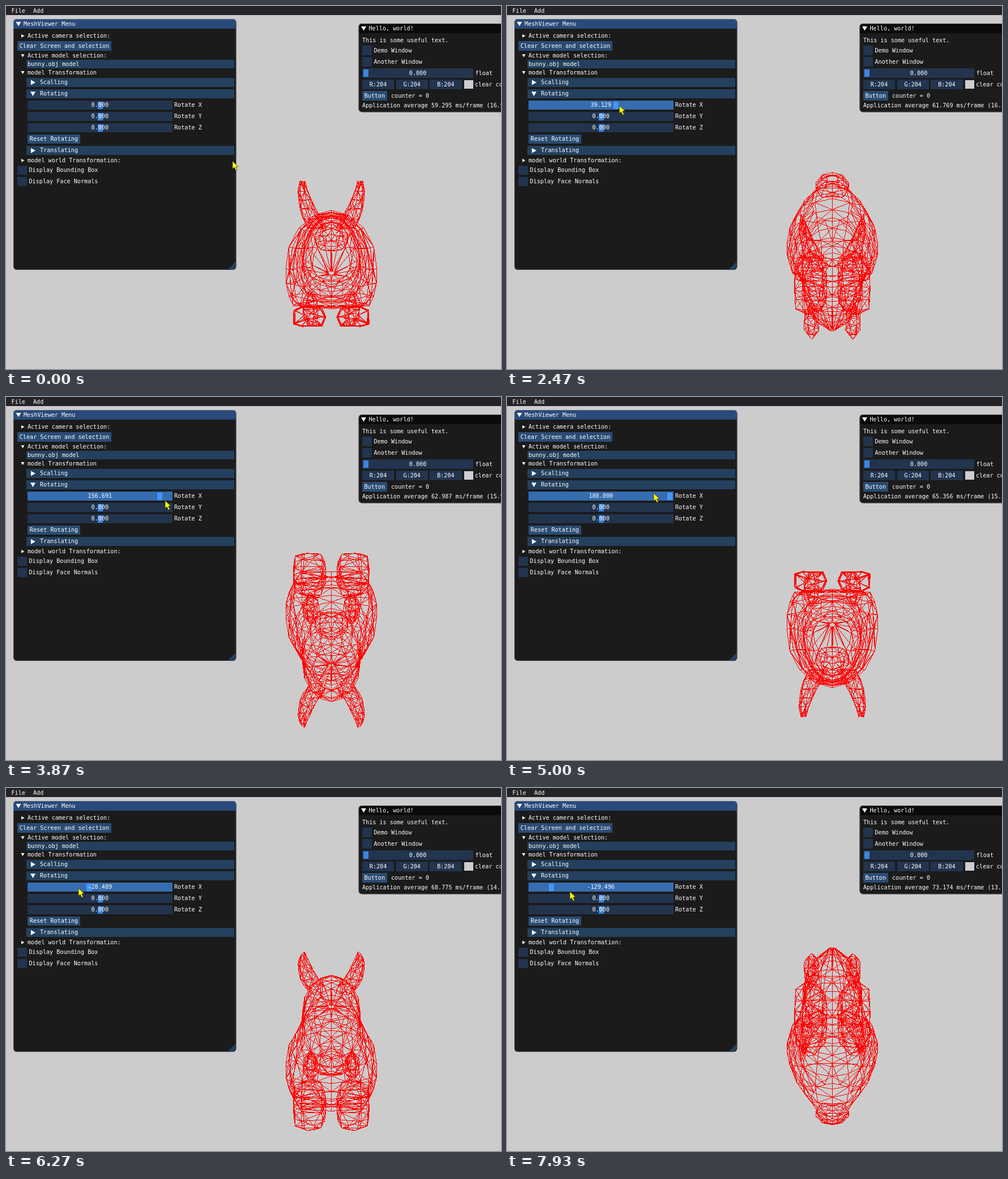
Animation, 874 px wide and 641 px high, one loop 8000 ms. Source, as an HTML page with a canvas:

```html
<!DOCTYPE html>
<html>
<head>
<meta charset="utf-8">
<style>
html, body { margin: 0; width: 100%; height: 100%; overflow: hidden; background: #ccc; }
canvas { display: block; }
</style>
</head>
<body>
<canvas id="stage" width="874" height="641"></canvas>
<script>
const c = document.getElementById('stage').getContext('2d');
const STEP = 200 / 3, STEPS = 120;
const FRAME = '#22344e', BUTTON = '#2a4c74', HEADER = '#24405f',
      GRAB = '#3d85e0', ACTIVE = '#356db0', ACTIVE_GRAB = '#4296fa';
const { PI, sin, cos, sqrt, abs, max, min, round } = Math;

// ---- timeline, in steps of 1/15 s ----
const HOVER = 14, PRESS = 22, ZERO_X = 166, PER_DEGREE = 0.675;
// step, x, y
const mouse = [[0, 400, 274], [6, 240, 66], [10, 101, 121], [14, 166, 172], [22, 169, 176], [27, 172.4965, 177],
  [28, 172, 177], [44, 218.8238, 175], [45, 220, 175], [52, 238, 178], [57, 274.7664, 182], [58, 281, 183],
  [66, 326, 190], [74, 291, 170], [75, 259, 170], [77, 242, 172], [93, 149.7699, 177], [94, 128, 177],
  [104, 23, 183], [108, 9, 187], [112, 12, 187], [118, 81.5902, 184], [119, 111, 183]];
const frameTime = [[0, 59.295], [28, 61.323], [45, 62.165], [58, 62.987], [75, 65.356], [94, 68.775], [119, 73.174]];

// Linear interpolation of column k; keys rise in column 0.
function at(keys, n, k) {
  let i = 1;
  while (i < keys.length - 1 && keys[i][0] < n) i++;
  const a = keys[i - 1], b = keys[i];
  return a[k] + (b[k] - a[k]) * (n - a[0]) / (b[0] - a[0]);
}

// The slider follows the pointer one step late, from the point where it was grabbed.
function angleAt(n) {
  if (n <= PRESS) return 0;
  const value = (at(mouse, n - 1, 1) - ZERO_X - 3) / PER_DEGREE;
  return max(-180, min(180, value));
}

// ---- mesh: one half, mirrored in x when drawn ----
let seed = 7;
const jitter = size => ((seed = seed * 16807 % 2147483647) / 2147483647 - 0.5) * size;
const list = (n, f) => Array.from({ length: n }, (_, i) => f(i));
const edges = [];

function skin(rings, closed) {
  const pts = rings.map(ring => ring.map(([x, y, z]) => [x && x + jitter(2), y + jitter(3), z + jitter(5)]));
  pts.forEach((ring, j) => ring.forEach((p, i) => {
    const k = closed ? (i + 1) % ring.length : i + 1;
    const next = pts[j + 1];
    if (next) edges.push([p, next[i]]);
    if (k >= ring.length) return;
    edges.push([p, ring[k]]);
    if (next) edges.push((i + j) % 2 ? [p, next[k]] : [ring[k], next[i]]);
  }));
}

// profile keys: z, top, bottom, half width
function hull(profile, count, n) {
  const z0 = profile[0][0], z1 = profile[profile.length - 1][0];
  skin(list(count, j => {
    const z = z0 + (z1 - z0) * j / (count - 1);
    const [top, bottom, w] = [1, 2, 3].map(k => at(profile, z, k));
    const mid = bottom + 0.4 * (top - bottom);
    return list(n + 1, i => {
      const t = PI * (i / n - 0.5), s = sin(t);
      const bulge = s < 0 && z > 20 && z < 140 ? 0.2 : 1;
      return [i % n ? -w * cos(t) ** bulge : 0, mid + s * (s > 0 ? top - mid : mid - bottom), z];
    });
  }), false);
}

function limb(count, n, point) {
  skin(list(count, j => list(n, i => point(j / (count - 1), 2 * PI * i / n))), true);
}

const boxy = v => Math.sign(v) * sqrt(abs(v));
const round4 = s => sqrt(1 - 0.9 * (2 * s - 1) ** 4);

hull([[-171, -32, -37, 6], [-140, 42, -52, 43], [-95, 70, -60, 52], [-60, 62, -78, 50], [0, 68, -88, 64],
  [58, 75, -96, 81], [108, 68, -97, 66], [150, 45, -50, 36]], 15, 8);            // body and head
hull([[150, 56, 4, 30], [160, 53, 5, 30], [174, 35, 22, 10]], 4, 5);             // tail
limb(7, 7, (s, t) => [-39 + 29 * round4(s) * boxy(cos(t)),                       // hind foot
  max(-128, -112 + 18 * round4(s) * boxy(sin(t))), -29 + 162 * s]);
limb(5, 6, (s, t) => [-37 + 13 * round4(s) * cos(t),                             // front paw
  max(-127, -68 - 62 * s), -60 - 16 * s + 16 * round4(s) * sin(t)]);
limb(6, 7, (s, t) => {                                                           // ear
  const dz = 18 * (1 - 0.2 * s * s) * sin(t);
  return [-26 - 25 * sin(s * PI / 2) + 17 * (1 - 0.85 * s * s) * cos(t) - 0.3 * s * dz, 45 + 82 * s, -88 + 27 * s + dz];
});

const mesh = { x: 484, y: 235, w: 180, h: 400 };
const image = c.createImageData(mesh.w, mesh.h);
const pixels = new Uint32Array(image.data.buffer);

function line(x0, y0, x1, y1) {
  const n = Math.ceil(max(abs(x1 - x0), abs(y1 - y0))) || 1;
  for (let i = 0; i <= n; i++) {
    const x = Math.floor(x0 + (x1 - x0) * i / n), y = Math.floor(y0 + (y1 - y0) * i / n);
    if (x >= 0 && x < mesh.w && y >= 0 && y < mesh.h) pixels[y * mesh.w + x] = 0xff0000ff;
  }
}

function drawMesh(degrees) {
  const a = degrees * PI / 180, ca = cos(a), sa = sin(a);
  const cx = 574.4 - mesh.x, cy = 437 - mesh.y;
  const py = p => cy - p[1] * ca - p[2] * sa;
  pixels.fill(0xffcccccc);
  for (const [p, q] of edges)
    for (const side of [1, -1]) line(cx + side * p[0], py(p), cx + side * q[0], py(q));
  c.putImageData(image, mesh.x, mesh.y);
}

// ---- interface: rows stack downwards, y is the middle of a row ----
const TEXT_H = 11.3, FRAME_H = 16.5, GAP = 3.55;
let rowTop;

function row(h) {
  const y = rowTop + h / 2;
  rowTop += h + GAP;
  return y;
}

function box(x, x2, y, h, fill) {
  const top = round(y - h / 2);
  c.fillStyle = fill;
  c.fillRect(round(x), top, round(x2) - round(x), round(y + h / 2) - top);
}

function text(s, x, y, align = 'left') {
  c.fillStyle = '#fff';
  c.textAlign = align;
  c.fillText(s, x, round(y + 3.2));
}

function poly(points, fill) {
  c.beginPath();
  points.forEach(([x, y]) => c.lineTo(x, y));
  c.closePath();
  c.fillStyle = fill;
  c.fill();
}

function arrow(x, y, r, open) {
  poly(open ? [[x - r, y - r * 0.8], [x + r, y - r * 0.8], [x, y + r * 0.9]]
            : [[x - r * 0.8, y - r], [x + r, y], [x - r * 0.8, y + r]], '#fff');
}

function panel(x, y, w, h, bar, title) {
  c.save();
  c.beginPath();
  c.roundRect(x, y, w, h, 6);
  c.fillStyle = '#1b1b1b';
  c.fill();
  c.clip();
  box(x, x + w, y + 8.25, FRAME_H, bar);
  c.restore();
  c.beginPath();
  c.roundRect(x + 0.5, y + 0.5, w - 1, h - 1, 6);
  c.strokeStyle = 'rgba(110,110,128,.5)';
  c.stroke();
  arrow(x + 9, y + 8.5, 4.5, true);
  text(title, x + 18, y + 8.5);
  rowTop = y + 24.2;
}

function node(s, open) {
  const y = row(TEXT_H);
  arrow(29.5, y, 3, open);
  text(s, 38, y);
}

function header(s, open) {
  const y = row(FRAME_H);
  box(36, 403, y, FRAME_H, HEADER);
  arrow(47.5, y, 4.5, open);
  text(s, 60, y);
}

function button(s, x, x2, y, fill = BUTTON) {
  box(x, x2, y, FRAME_H, fill);
  text(s, (x + x2) / 2, y, 'center');
}

function check(s, x) {
  const y = row(FRAME_H);
  box(x, x + FRAME_H, y, FRAME_H, FRAME);
  text(s, x + 20.5, y);
}

function slider(label, x, w, grabX, value, fill = FRAME, grab = GRAB) {
  const y = row(FRAME_H);
  box(x, x + w, y, FRAME_H, fill);
  box(grabX - 4.5, grabX + 4.5, y, 13, grab);
  text(value.toFixed(3), x + w / 2, y, 'center');
  text(label, x + w + 3.5, y);
}

function drawMenu(n, angle) {
  panel(13, 23, 393.5, 443, '#294a7a', 'MeshViewer Menu');
  poly([[406, 451], [406, 460], [400, 466], [391, 466]], HEADER);
  node('Active camera selection:', false);
  button('Clear Screen and selection', 20, 186, row(FRAME_H));
  node('Active model selection:', true);
  const y = row(TEXT_H);
  box(36, 403, y, TEXT_H + GAP, HEADER);
  text('bunny.obj model', 38, y);
  node('model Transformation', true);
  header('Scalling', false);
  header('Rotating', true);
  const fill = n < HOVER ? FRAME : n < PRESS ? BUTTON : ACTIVE;
  slider('Rotate X', 38, 255.5, ZERO_X + angle * PER_DEGREE, angle, fill, n < PRESS ? GRAB : ACTIVE_GRAB);
  for (const axis of 'YZ') slider('Rotate ' + axis, 38, 255.5, ZERO_X, 0);
  button('Reset Rotating', 38, 131, row(FRAME_H));
  header('Translating', false);
  node('model world Transformation:', false);
  check('Display Bounding Box', 20);
  check('Display Face Normals', 20);
}

function drawInfo(ms) {
  panel(622.5, 31, 300, 156.5, '#0b0b0b', 'Hello, world!');
  text('This is some useful text.', 629, row(TEXT_H));
  check('Demo Window', 629);
  check('Another Window', 629);
  slider('float', 629, 196, 635.5, 0);
  let y = row(FRAME_H);
  [...'RGB'].forEach((s, i) => button(s + ':204', 629 + 59.6 * i, 685 + 59.8 * i, y, FRAME));
  box(809, 824.5, y, 15, '#cdcdd2');
  text('clear color', 828, y);
  y = row(FRAME_H);
  button('Button', 629, 672.5, y);
  text('counter = 0', 680, y);
  text(`Application average ${ms.toFixed(3)} ms/frame (${(1000 / ms).toFixed(1)} FPS)`, 629, row(TEXT_H));
}

function drawCursor(x, y) {
  poly([[0, 0], [0, 13.5], [3, 11], [6, 16.5], [8.3, 15.3], [5.6, 10], [10, 9.5]]
    .map(([dx, dy]) => [x + dx, y + dy]), '#ff0');
  c.strokeStyle = 'rgba(40,40,40,.7)';
  c.stroke();
}

function draw(n) {
  const angle = angleAt(n);
  c.fillStyle = '#ccc';
  c.fillRect(0, 0, 874, 641);
  drawMesh(angle);
  c.font = '10.13px "DejaVu Sans Mono", monospace';
  box(0, 874, 8, 16, '#242428');
  text('File', 9.5, 8.5);
  text('Add', 48, 8.5);
  drawMenu(n, angle);
  drawInfo(at(frameTime, n, 1));
  drawCursor(at(mouse, n, 1), at(mouse, n, 2));
}

const start = performance.now();
function tick() {
  const t = (performance.now() - start) % 8000;
  draw(Math.floor((t + 4) / STEP) % STEPS);
  requestAnimationFrame(tick);
}
tick();
</script>
</body>
</html>
```
